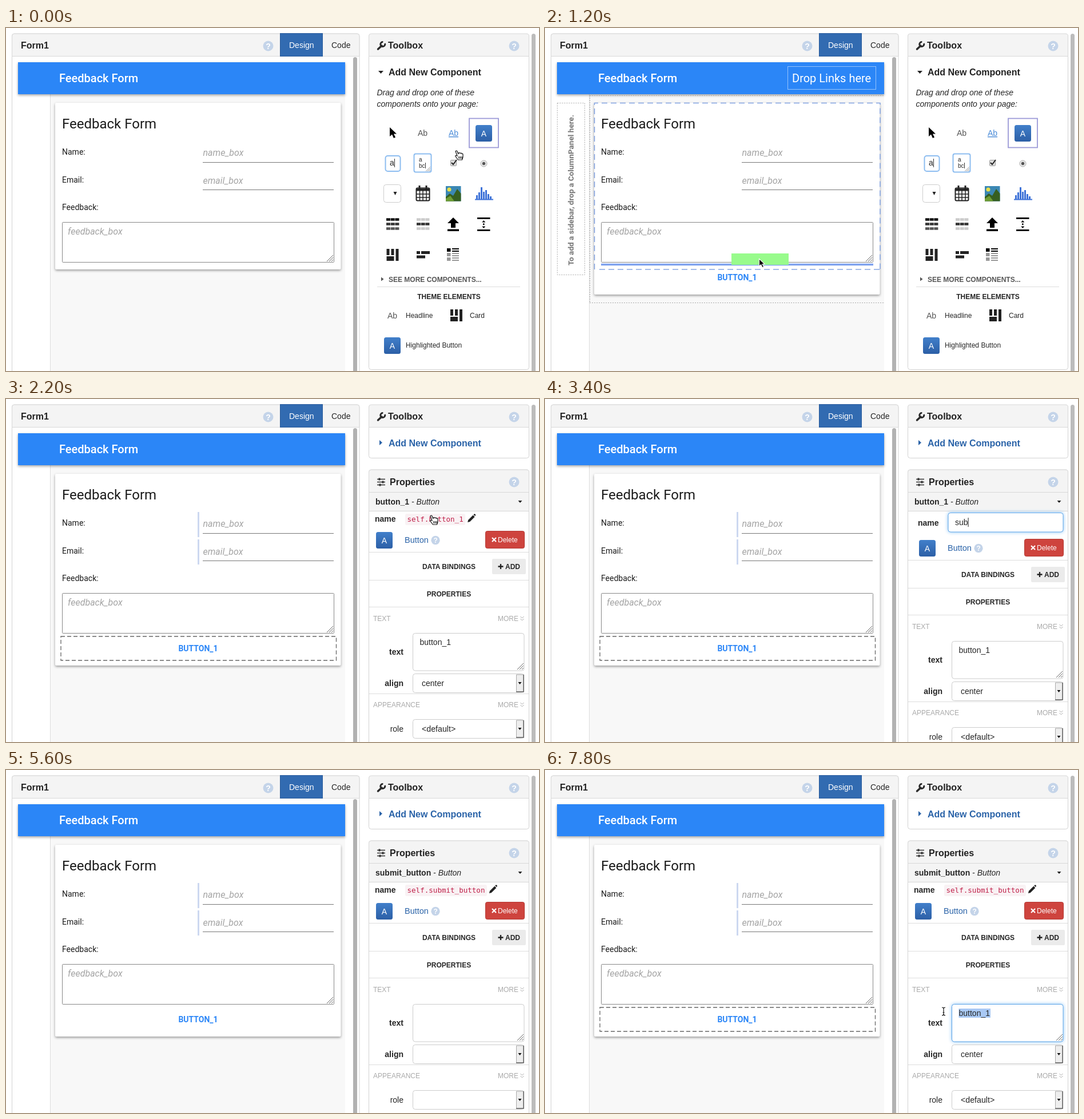
These frames come from a looping animation (932x601 px, 8000 ms). An HTML page:

```html
<!DOCTYPE html>
<html lang="en">
<head>
<meta charset="utf-8">
<title>Form designer</title>
<style>
html, body { margin: 0; width: 100%; height: 100%; overflow: hidden; background: #fff; }
svg { display: block; width: 932px; height: 601px; }
text { font: 14px "Liberation Sans", Arial, sans-serif; fill: #262626; white-space: pre; }
.b { font-weight: bold; }
.h { font-size: 16px; font-weight: bold; fill: #222; }
.s { font-size: 12px; }
.i { font-style: italic; }
.g { fill: #aaa; }
.link { fill: #2a63a8; }
.m { text-anchor: middle; }
.e { text-anchor: end; }
.r { font-family: Roboto, sans-serif; fill: #1c1c1c; }
.w { fill: #fff; }
.ph { font-size: 16px; font-style: italic; fill: #a4a4a4; }
.code { font: 12.55px "DejaVu Sans Mono", monospace; fill: #c0214a; }
.line { fill: none; stroke: #ddd; }
.panel { fill: #fff; stroke: #d3d3d3; }
.head { fill: #f4f4f4; stroke: #d8d8d8; }
.field { fill: #fff; stroke: #ccc; }
.focus { fill: #fff; stroke: #5ba3e6; filter: drop-shadow(0 0 3px #8cc4f5); }
.card { fill: #fff; filter: drop-shadow(0 2px 2px rgba(0,0,0,.38)); }
.dot { fill: none; stroke: #aaa; stroke-dasharray: 2 2; }
.k { fill: #222; }
</style>
</head>
<body>
<svg id="stage" viewBox="0 0 932 601">
<defs>
  <linearGradient id="blue" x2="0" y2="1"><stop stop-color="#417fca"/><stop offset="1" stop-color="#2c5fa6"/></linearGradient>
  <g id="help"><circle r="9" fill="#c4d4e9"/><text class="b w m" y="5">?</text></g>
  <g id="aButton"><rect x="-14" y="-14" width="29" height="29" rx="3.500" fill="url(#blue)"/><text class="w m" x=".5" y="5.500">A</text></g>
  <path id="grip" d="M-11 0L0-11M-7 0L0-7M-3 0L0-3" stroke="#666" fill="none"/>
  <path id="more" d="M0 0l3 3l3-3M0 4l3 3l3-3" stroke="#aaa" fill="none"/>
  <path id="pointer" d="M0 0V16L4 12.5L7 19L10 17.6L7 11.5H12Z"/>
  <path id="cardIcon" class="k" d="M0 0h5v11h-5zM8 0h5v11h-5zM0 13h13v8h-13zM16 0h5v21h-5z"/>
  <g id="select">
    <rect class="field" x="711.5" y=".5" width="194" height="33" rx="4"/>
    <path d="M892.5 2h13v30h-13z" fill="#eee" stroke="#aaa"/>
    <path d="M905 2v30h-13" fill="none" stroke="#666" stroke-width="1.5"/>
    <path d="M895.500 15h6l-3 4z" fill="#111"/>
  </g>
</defs>

<path class="panel" d="M10.500 601V14q0-4 4-4H614q4 0 4 4V601"/>
<path class="head" d="M10.500 49.500V14q0-4 4-4H614q4 0 4 4V49.500z"/>
<text class="h" x="26" y="36">Form1</text>
<use href="#help" x="458.500" y="31.500"/>
<rect x="479.500" y="9.500" width="74" height="40" fill="#326bb1" stroke="#2a5c9c"/>
<text class="w" x="495" y="35">Design</text><text x="569" y="35">Code</text>
<rect x="607" y="51" width="7" height="560" rx="3.500" fill="#b2b2b2"/>
<rect x="919" y="10" width="7" height="600" rx="3.500" fill="#bcbcbc"/>

<rect x="78" y="100" width="515" height="501" fill="#f8f8f8"/>
<path class="line" d="M77.500 116V601"/>
<rect x="21" y="60" width="572" height="56" fill="#2b86f7" style="filter:drop-shadow(0 2px 2px rgba(0,0,0,.35))"/>
<text class="r w" x="93" y="94.500" style="font-size:20px;font-weight:500">Feedback Form</text>
<rect id="card" class="card" x="86" y="131" width="499.500" height="292" rx="2"/>
<text class="r" x="98" y="176" style="font-size:24px">Feedback Form</text>
<g id="labels"></g>
<path d="M344 235.500H573M344 283.500H573" stroke="#777"/>
<rect x="98.500" y="340.500" width="475" height="70" rx="1" fill="#fff" stroke="#888"/>
<text class="r ph" x="108" y="362">feedback_box</text>
<use href="#grip" x="572" y="409"/>
<text id="newButton" class="r m" x="336" y="441.500" style="font-weight:bold;fill:#2b86f7">BUTTON_1</text>
<path id="resizers" d="M336.500 198v44M336.500 246v44" stroke="#cdd8f0" stroke-width="3"/>
<rect id="selected" x="96" y="416" width="481.500" height="42" fill="none" stroke="#666" stroke-width="1.300" stroke-dasharray="7 4"/>

<g id="zones">
  <rect x="424.500" y="67.500" width="154" height="40" fill="none" stroke="#fff" stroke-dasharray="1 1"/>
  <text class="r w" x="432" y="94.500" style="font-size:20px">Drop Links here</text>
  <rect class="dot" x="21.500" y="131.500" width="48" height="301"/>
  <text class="r" transform="translate(50 416) rotate(-90)" style="font-size:13.6px;font-weight:bold;fill:#777">To add a sidebar, drop a ColumnPanel here.</text>
  <path id="outline" class="dot"/>
  <path d="M86.500 423V131.500H586V423M95 423H586" fill="none" stroke="#85a5e2" stroke-width="1.600" stroke-dasharray="10 6"/>
  <path id="dropSide" d="M574 341V410" stroke="#6d95ee" stroke-width="3"/>
  <path id="dropBelow" d="M98 414.500H574" stroke="#7fa2ef" stroke-width="3.500"/>
  <rect id="ghost" width="100" height="20" fill="#98fb8c"/>
</g>

<g id="toolbox">
  <rect class="panel" x="634.500" y="10.500" width="280" height="588" rx="4"/>
  <path d="M651 75h9l-4.500 5z" class="k"/>
  <text class="h" x="669" y="83">Add New Component</text>
  <text class="i" x="648.500" y="117.500">Drag and drop one of these</text>
  <text class="i" x="648.500" y="137.500">components onto your page:</text>
  <use href="#pointer" x="671" y="174"/>
  <text class="m" x="728.500" y="189" style="fill:#555">Ab</text>
  <text class="m" x="782.500" y="189" style="fill:#4a8bd8;text-decoration:underline">Ab</text>
  <rect x="810" y="158.500" width="51" height="51" fill="none" stroke="#9c9ad8" stroke-width="1.800"/>
  <use href="#aButton" x="835" y="184"/>
  <g fill="#fff" stroke="#8dbdf0" stroke-width="2">
    <rect x="663.500" y="224" width="26" height="27" rx="4"/><rect x="713.500" y="220.500" width="30" height="32" rx="3"/>
  </g>
  <text x="671" y="241">a</text><path d="M679.500 229v15M733.500 236v10" stroke="#333"/>
  <text x="722" y="234" style="font-size:10px">a</text><text x="722" y="245" style="font-size:10px">bc</text>
  <use href="#grip" transform="translate(742 251) scale(.7)"/>
  <rect x="777.500" y="231.500" width="10" height="10" rx="1" fill="#ddd" stroke="#999"/>
  <path d="M779 236l3 3l6-8" fill="none" stroke="#222" stroke-width="2"/>
  <circle cx="835.500" cy="237.500" r="5.500" fill="#e8e8e8" stroke="#aaa"/><circle cx="835.500" cy="237.500" r="2.700" fill="#555"/>
  <rect class="field" x="660.500" y="274.500" width="30" height="31" rx="4"/><path class="k" d="M677.500 287h6l-3 6z"/>
  <rect x="717.500" y="280.500" width="23" height="22" rx="2" fill="#fff" stroke="#222" stroke-width="2"/>
  <path d="M717 283.500H741" stroke="#222" stroke-width="4"/>
  <path d="M717 291H741M717 297H741M723.500 285V303M729 285V303M735 285V303" stroke="#222" stroke-width="1.500"/>
  <path d="M723 276v6M735 276v6" stroke="#222" stroke-width="3"/>
  <rect x="769" y="277" width="26.500" height="26.500" fill="#3c88b4"/>
  <circle cx="775" cy="283" r="3.500" fill="#e6df4c"/>
  <path d="M769 296l7-6l6 4l7-12l6.500 8v13.500H769z" fill="#365f20"/><path d="M769 299l8-5l7 9.500h-15z" fill="#6f9d35"/>
  <path d="M820 300.500h32" stroke="#3f73d8" stroke-width="2"/>
  <path d="M823.500 301v-8M827.500 301v-13M831.500 301v-22M835.500 301v-14M839.500 301v-17M843.500 301v-10M847.500 301v-6" stroke="#3f73d8" stroke-width="3"/>
  <g id="tables" stroke-width="4.500" stroke-dasharray="7 .7"></g>
  <path d="M782 332l10 10h-6v8h-8v-8h-6zM772 352.500h20v3.500h-20zM824 332h22.500v2.800H824zM824 353h22.500v2.800H824zM835.300 337l3 3.500h-6zM835.300 351l-3-3.500h6zM834 342.500h2.600v2.600H834z"/>
  <use href="#cardIcon" x="665.500" y="387"/>
  <path class="k" d="M718 391h6v5h-6zM726 391h15v5h-15zM718 398.500h15v5h-15z"/>
  <path d="M771 386h6.500v6H771zM780 386h12v2h-12zM780 390h12v2h-12z"/>
  <path fill="#999" d="M771 394h6.500v6H771zM780 394h12v2h-12zM780 398h12v2h-12zM771 402h6.500v6H771zM780 402h12v2h-12zM780 406h12v2h-12z"/>
  <path d="M656 436.500v7l4.500-3.500z" fill="#555"/>
  <text class="s b" x="669" y="444.500" style="fill:#555">SEE MORE COMPONENTS...</text>
  <path class="line" d="M649 453.500H899"/>
  <text class="s b m" x="774.500" y="474.500">THEME ELEMENTS</text>
  <text class="m" x="675.500" y="508.500" style="fill:#555">Ab</text><text class="s" x="699" y="507.500">Headline</text>
  <use href="#cardIcon" x="777" y="493"/><text class="s" x="811" y="507.500">Card</text>
  <use href="#aButton" x="675" y="556"/><text class="s" x="699" y="560">Highlighted Button</text>
</g>

<g id="props">
  <rect class="panel" x="634.500" y="10.500" width="280" height="93" rx="4"/>
  <path d="M653 72v9l5-4.500z" class="link"/><text class="h link" x="669" y="83">Add New Component</text>
  <path class="panel" d="M634.500 601V128q0-4 4-4H910q4.500 0 4.500 4V601"/>
  <path class="head" d="M634.500 163.500V128q0-4 4-4H910q4.500 0 4.500 4V163.500z"/>
  <path d="M649 140.500h14M649 145.500h14M649 150.500h14" stroke="#333" stroke-width="1.500"/>
  <path d="M653 138.500v4M659 143.500v4M654 148.500v4" stroke="#333" stroke-width="3"/>
  <text class="h" x="671" y="150.500">Properties</text><use href="#help" x="888.500" y="145.500"/>
  <rect class="head" x="634.500" y="163.500" width="280" height="33"/>
  <text x="646" y="185"><tspan class="b" id="title"></tspan><tspan class="i"> - Button</tspan></text>
  <path class="k" d="M895.500 178h7l-3.500 4z"/>
  <text class="b" id="nameLabel">name</text>
  <g id="nameView">
    <rect id="codeBack" x="698" y="201" height="20" rx="3" fill="#f9f2f4"/><text class="code" id="code" x="701.500" y="215"></text>
    <path id="pencil" class="k" d="M0 13l1-4l8.500-8.500l3 3L4 12zM10.300-.3l1.200-1.200q1-.5 2 .5t.4 2l-1 1z"/>
  </g>
  <g id="nameEdit">
    <rect class="focus" x="705" y="199.500" width="201" height="33.500" rx="4"/>
    <rect id="nameSel" x="717" y="208" width="55" height="16" fill="#abcdf8"/>
    <text id="typed" x="717" y="221"></text><path id="caret" d="M.5 208v16" stroke="#222"/>
  </g>
  <g id="lower">
    <g id="typeLink"><use href="#aButton" x="661" y="247"/><text class="link" x="697" y="252" style="font-size:14.5px">Button</text>
      <use href="#help" transform="translate(751 247.500) scale(.85)"/></g>
    <rect x="838.500" y="231.500" width="68" height="30" rx="3" fill="#ce443e" stroke="#b53a35"/>
    <path d="M850 243l7 7m0-7l-7 7" stroke="#fff" stroke-width="2.200"/><text class="s w" x="860" y="250.500">Delete</text>
    <path class="line" d="M635 268.500H914M635 317.500H914M635 364.500H914M635 516.500H914"/>
    <text class="s b m" x="774.500" y="297.500">DATA BINDINGS</text>
    <rect x="850" y="280" width="59" height="27" rx="2" fill="#ebebeb"/>
    <path d="M865 289v9M860.500 293.500h9" stroke="#222" stroke-width="2.300"/><text class="s b" x="873" y="297.500">ADD</text>
    <text class="s b m" x="774.500" y="345.500">PROPERTIES</text>
    <text class="s g" x="642" y="388.500">TEXT</text><text class="s g" x="860" y="388.500">MORE</text><use href="#more" x="899.500" y="381"/>
    <text class="b e" x="695" y="448">text</text>
    <rect id="area" x="711.500" y="410.500" width="194.500" height="65.500" rx="4"/>
    <rect id="textSel" y="418" height="16" fill="#a9c9f5"/><use href="#grip" x="905" y="474"/>
    <text class="b e" x="695" y="503">align</text><use href="#select" y="481"/>
    <text class="s g" x="642" y="539.500">APPEARANCE</text><text class="s g" x="860" y="539.500">MORE</text><use href="#more" x="899.500" y="532"/>
    <text class="e" x="695" y="583">role</text><use href="#select" y="561"/>
    <g id="values"><text x="723.500" y="431">button_1</text><text x="727" y="503">center</text><text x="727" y="583" style="font-size:14.2px">&lt;default&gt;</text></g>
  </g>
</g>

<path class="head" d="M634.500 49.500V14q0-4 4-4H910q4.500 0 4.500 4V49.500z"/>
<path d="M650.500 37l6.500-6" stroke="#2b2b2b" stroke-width="3.500" stroke-linecap="round"/>
<path d="M662.500 27a4 4 0 1 1-3.200-2.500" fill="none" stroke="#2b2b2b" stroke-width="3"/>
<text class="h" x="668" y="36">Toolbox</text><use href="#help" x="888.500" y="31.500"/>

<g id="arrow"><use href="#pointer" transform="translate(-.5 -6.500) scale(.8)" stroke="#fff" stroke-width="1.300"/></g>
<path id="hand" d="M-6-7q2-2 3 0l2 5l0-2q2-1 3 .5q2-1 3 .8q2-.5 2 1.200V3q-.5 2-1.500 5H-1.500L-6 2q-1-2 1.500-1.500L-3 1zM0 2v4M2.500 2v4M5 2v4" fill="#fff" stroke="#111" stroke-width="1.200"/>
<path id="beam" d="M-3-7q3 0 3 2V5q0 2-3 2M3-7q-3 0-3 2M0 5q0 2 3 2M-1.500 2h3" fill="none" stroke="#111" stroke-width="1.200"/>
</svg>
<script>
const $ = id => document.getElementById(id);
const show = (id, on) => { $(id).style.display = on ? '' : 'none'; };
const move = (id, x, y) => $(id).setAttribute('transform', `translate(${x} ${y})`);
const LOOP = 8000, STEP = 100;

$('labels').innerHTML = ['Name', 'Email', 'Feedback'].map((s, i) =>
  `<text class="r" x="98" y="${222 + i * 48.500}">${s}:</text>` +
  (i < 2 ? `<text class="r ph" x="344.500" y="${224 + i * 49}">${s.toLowerCase()}_box</text>` : '')).join('');
$('tables').innerHTML = [[665, '#111', '#333', '#555'], [718, '#ccc', '#333', '#ccc']].map(([x, ...rows]) =>
  rows.map((c, i) => `<path d="M${x} ${335.500 + i * 8}h22.500" stroke="${c}"/>`).join('')).join('');

// Keys are [time, x, y]
const drag = [[0, 792, 223], [100, 750, 243], [200, 660, 285], [300, 560, 332], [400, 460, 375], [500, 409, 396],
  [700, 387, 403], [900, 376, 411], [1200, 375, 411], [1300, 380, 407], [1500, 480, 345], [1700, 620, 265], [1900, 722, 222], [2200, 748, 212]];
const select = [[6100, 752, 240], [6400, 782, 380], [6800, 788, 426], [7000, 785, 426], [7200, 750, 425], [7500, 697, 423]];
const ghostKeys = [[300, 524, 306], [400, 424, 349], [500, 373, 370], [700, 347, 381], [900, 328, 394], [1000, 326, 395]];
const keystrokes = [3100, 3200, 3400, 3700, 3900, 4000, 4200, 4500, 4700, 4800, 5000, 5100, 5300];
const newName = 'submit_button';

function at(keys, t) {
  const i = keys.findIndex(k => k[0] > t);
  if (i < 0) return keys[keys.length - 1].slice(1);
  if (i === 0) return keys[0].slice(1);
  const [a, b] = [keys[i - 1], keys[i]], p = (t - a[0]) / (b[0] - a[0]);
  return [a[1] + (b[1] - a[1]) * p, a[2] + (b[2] - a[2]) * p];
}

function drawForm(t) {
  const dropped = t >= 1200;
  $('card').setAttribute('height', dropped ? 336 : 292);
  $('outline').setAttribute('d', `M78 118.500H593M78 ${dropped ? 481.500 : 437.500}H593M78.500 118V${dropped ? 481 : 437}`);
  show('newButton', dropped);
  show('zones', t >= 300 && t < 1300);
  show('dropSide', t < 900);
  show('dropBelow', t >= 900);
  move('ghost', ...at(ghostKeys, t));
  show('resizers', t >= 1300);
  show('selected', t >= 1300 && (t < 5600 || t >= 5800));
}

function drawPanel(t, x) {
  const editing = t >= 2500 && t < 5600, shift = editing ? 14 : 0;
  const name = t < 5600 ? 'button_1' : newName;
  show('toolbox', t < 1300);
  show('props', t >= 1300);
  $('title').textContent = name;
  $('code').textContent = 'self.' + name;
  const codeWidth = (name.length + 5) * 7.550;
  $('codeBack').setAttribute('width', codeWidth + 7);
  move('pencil', 709 + codeWidth, 203);
  move('nameLabel', editing ? 652 : 645, editing ? 221.500 : 215);
  show('nameView', !editing);
  show('nameEdit', editing);
  const count = keystrokes.filter(k => k <= t).length;
  show('nameSel', count === 0);
  show('caret', count > 0);
  $('typed').textContent = count ? newName.slice(0, count) : 'button_1';
  if (editing) move('caret', 717 + $('typed').getComputedTextLength(), 0);
  move('lower', 0, shift);
  move('typeLink', shift / 2, 0);
  show('values', t < 5600 || t >= 5800);
  const left = Math.max(723.500, Math.min(779, x));
  $('area').setAttribute('class', t >= 7000 ? 'focus' : 'field');
  show('textSel', t >= 7000);
  $('textSel').setAttribute('x', left);
  $('textSel').setAttribute('width', 779 - left);
}

function drawCursor(t, x, y) {
  const kind = t >= 3100 && t < 6100 ? '' : t >= 6400 || (t >= 2500 && t < 3100) ? 'beam'
    : t < 300 || (t >= 1900 && t < 2500) ? 'hand' : 'arrow';
  for (const id of ['arrow', 'hand', 'beam']) {
    show(id, id === kind);
    move(id, x, y);
  }
}

function frame() {
  const t = Math.floor(performance.now() % LOOP / STEP) * STEP;
  const [x, y] = at(t < 6000 ? drag : select, t);
  drawForm(t);
  drawPanel(t, x);
  drawCursor(t, x, y);
  requestAnimationFrame(frame);
}
frame();
</script>
</body>
</html>
```
